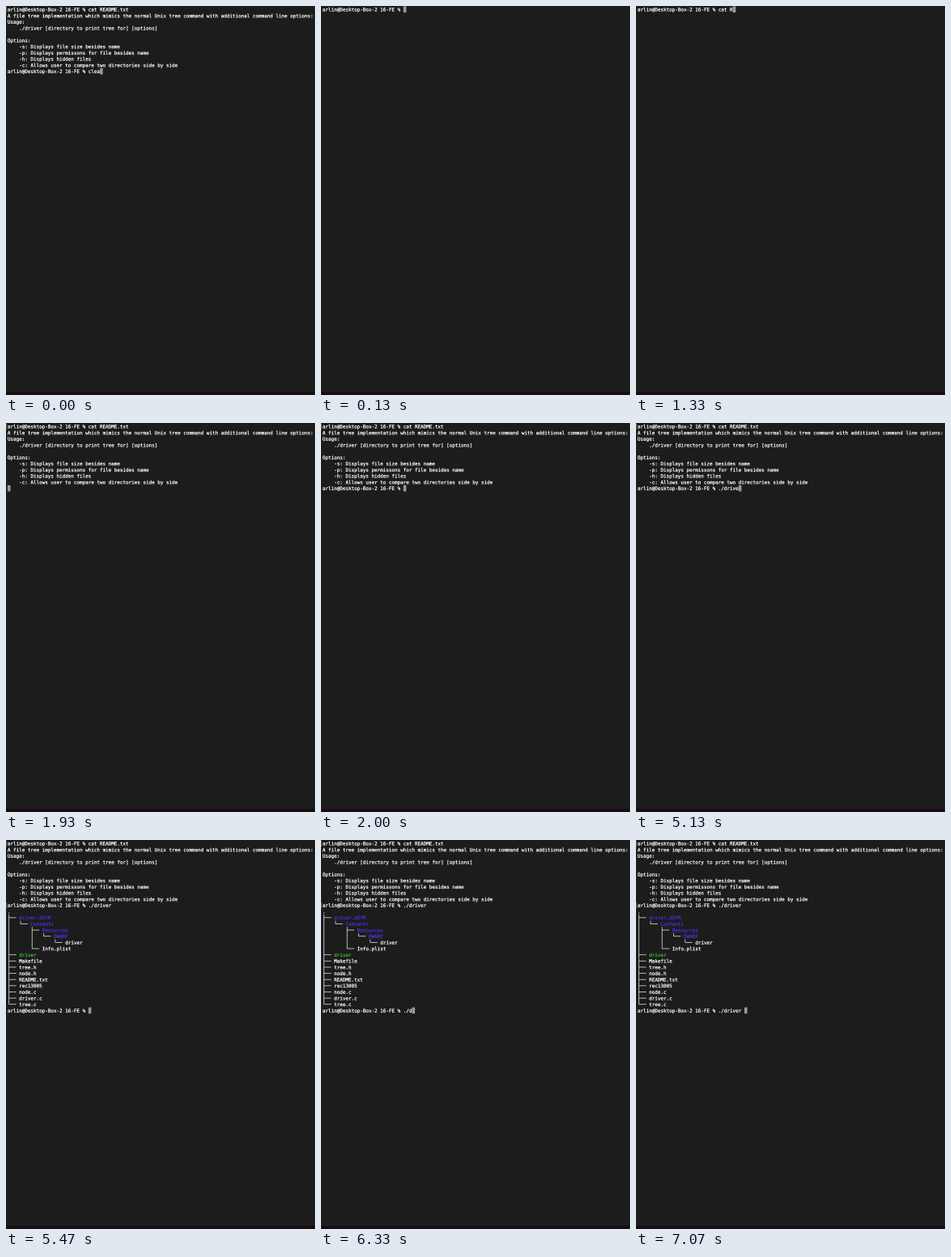
Write an HTML page with a canvas that moves like this. It is 382 px wide and 480 px high and loops after 8000 ms.

```html
<!DOCTYPE html>
<html lang="en">
<head>
<meta charset="utf-8">
<title>Terminal</title>
<style>
  html, body { margin: 0; width: 100%; height: 100%; overflow: hidden; background: #1c1c1c; }
  canvas { display: block; width: 382px; height: 480px; }
</style>
</head>
<body>
<canvas id="screen" width="382" height="480"></canvas>
<script>
const W = 382, H = 480, SCALE = 4, LOOP = 8000;
const LEFT = 1.9, CELL = 3.57, ROW = 7.635, BASE = 6.5;
const WHITE = '#ffffff', BLUE = '#4c30d8', GREEN = '#34bc2c';

const out = document.getElementById('screen').getContext('2d');
out.imageSmoothingQuality = 'high';

// Drawn large, then reduced, so small text keeps its exact place
const buffer = document.createElement('canvas');
buffer.width = W * SCALE;
buffer.height = H * SCALE;
const ctx = buffer.getContext('2d');
ctx.scale(SCALE, SCALE);
ctx.font = '5.93px "DejaVu Sans Mono", "Liberation Mono", monospace';
ctx.lineWidth = 0.26;
ctx.lineJoin = 'round';

const PROMPT = 'arlin@Desktop-Box-2 16-FE % ';
const CAT = PROMPT + 'cat README.txt';
const HELP = [
  'A file tree implementation which mimics the normal Unix tree command with additional command line options:',
  'Usage:',
  '    ./driver [directory to print tree for] [options]',
  '',
  'Options:',
  '    -s: Displays file size besides name',
  '    -p: Displays permissons for file besides name',
  '    -h: Displays hidden files',
  '    -c: Allows user to compare two directories side by side'
];
// Branch characters, name, colour
const TREE = [
  ['', '.'],
  ['├── ', 'driver.dSYM', BLUE],
  ['│   └── ', 'Contents', BLUE],
  ['│       ├── ', 'Resources', BLUE],
  ['│       │   └── ', 'DWARF', BLUE],
  ['│       │       └── ', 'driver'],
  ['│       └── ', 'Info.plist'],
  ['├── ', 'driver', GREEN],
  ...['Makefile', 'tree.h', 'node.h', 'README.txt', 'rec13005', 'node.c', 'driver.c']
    .map(name => ['├── ', name]),
  ['└── ', 'tree.c']
];

// Screen contents above the live line; marks are the rows already entered
const EMPTY = { lines: [], marks: [] };
const READ = { lines: [CAT, ...HELP], marks: [0] };
const LISTED = { lines: [CAT, ...HELP, PROMPT + './driver', ...TREE], marks: [0, 10] };

const steps = [];
const add = (time, view, live, extra) => steps.push({ time, ...view, live, ...extra });
const type = (view, keys) => keys.forEach(([time, text]) => add(time, view, PROMPT + text));

type(READ, [[0, 'clea']]);
add(70, { lines: [...READ.lines, PROMPT + 'clear'], marks: [0, 10] }, '');
type(EMPTY, [[130, ''], [730, 'c'], [870, 'ca'], [1070, 'cat '], [1330, 'cat R'],
  [1400, 'cat RE'], [1530, 'cat README.txt ']]);
add(1600, EMPTY, CAT + ' ', { marks: [0] });
add(1930, READ, '');
type(READ, [[2000, ''], [4330, '.'], [4400, './'], [4600, './d'], [4800, './dr'],
  [4930, './dri'], [5000, './driv'], [5070, './drive'], [5200, './driver']]);
type(LISTED, [[5470, ''], [6130, '.'], [6200, './'], [6330, './d'], [6530, './dr'],
  [6670, './dri'], [6730, './driv'], [6870, './drive'], [6930, './driver'], [7070, './driver ']]);

const colX = col => LEFT + col * CELL;

function rect(color, x, y, w, h) {
  ctx.fillStyle = color;
  ctx.fillRect(x, y, w, h);
}

// A thin outline gives the slightly heavy screen weight
function text(str, col, row, color = WHITE) {
  const x = colX(col), y = row * ROW + BASE;
  ctx.fillStyle = ctx.strokeStyle = color;
  ctx.fillText(str, x, y);
  ctx.strokeText(str, x, y);
}

function branches(str, row) {
  const top = row * ROW + 0.4, mid = top + ROW / 2, line = 0.8;
  [...str].forEach((ch, col) => {
    const x = colX(col), cx = x + CELL / 2;
    if ('│├└'.includes(ch)) rect('#e0e0e0', cx - line / 2, top, line, ch === '└' ? ROW / 2 : ROW);
    if ('├└'.includes(ch)) rect('#e0e0e0', cx, mid - line / 2, CELL / 2, line);
    if (ch === '─') rect('#e0e0e0', x, mid - line / 2, CELL, line);
  });
}

function mark(row) {
  const y = row * ROW + 1;
  rect('#8c8c8c', 0, y, 0.6, 6.6);
  rect('#8c8c8c', 0, y, 1, 0.5);
  rect('#8c8c8c', 0, y + 6.1, 1, 0.5);
}

function draw({ lines, marks, live }) {
  rect('#1c1c1c', 0, 0, W, H);
  rect('#170d13', 0, 476, W, 4);

  lines.forEach((line, row) => {
    if (typeof line === 'string') return text(line, 0, row);
    const [stem, name, color] = line;
    branches(stem, row);
    text(name, stem.length, row, color);
  });
  marks.forEach(mark);

  const row = lines.length;
  text(live, 0, row);
  rect('#999', colX(live.length), row * ROW + 0.4, CELL, ROW);
  out.drawImage(buffer, 0, 0, W, H);
}

const start = performance.now();
let shown;
function tick() {
  const t = (performance.now() - start) % LOOP;
  const step = steps.findLast(s => s.time <= t) || steps[0];
  if (step !== shown) draw(shown = step);
  requestAnimationFrame(tick);
}
tick();
</script>
</body>
</html>
```
